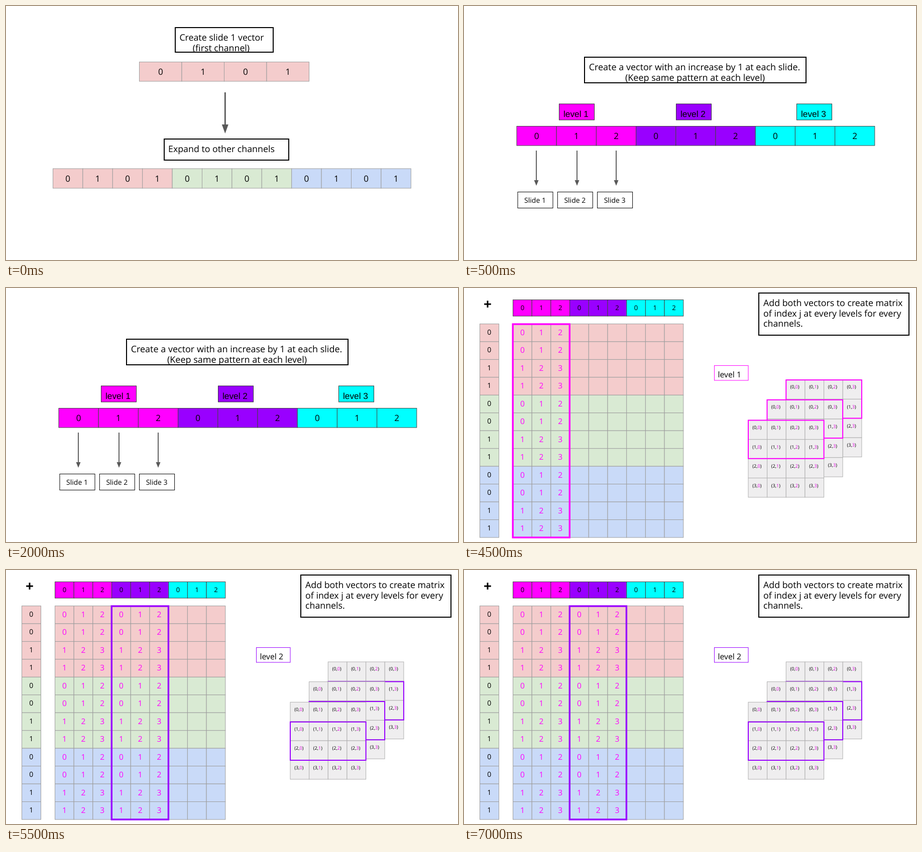
An HTML page that plays this animation: 900 px wide and 506 px high, repeating every 8 s.

```html
<!DOCTYPE html>
<html lang="en">
<head>
<meta charset="utf-8">
<title>Index matrix</title>
<style>
  html, body { margin: 0; width: 100%; height: 100%; overflow: hidden; background: #fff; }
  svg { display: block; width: 100%; height: 100%; }
  text { font-family: "Open Sans", "Noto Sans", sans-serif; text-rendering: geometricPrecision; }
  .arial { font-family: "Liberation Sans", Arial, sans-serif; }
</style>
</head>
<body>
<svg id="stage" viewBox="0 0 900 506"></svg>
<script>
const NS = "http://www.w3.org/2000/svg";
const stage = document.getElementById("stage");
const MAGENTA = "#ff00ff", PURPLE = "#9900ff", CYAN = "#00ffff";
const LEVELS = [MAGENTA, PURPLE, CYAN];
const CHANNELS = ["#f4cccc", "#d9ead3", "#c9daf8"];
const GRAY = "#9e9e9e", ARROW = "#595959";
const BODY = 17.8;
const LOOP = 8000;

function add(parent, tag, attrs) {
  const el = document.createElementNS(NS, tag);
  for (const key in attrs) el.setAttribute(key, attrs[key]);
  return parent.appendChild(el);
}

function rect(g, x, y, w, h, fill, stroke, width = 1) {
  return add(g, "rect", { x, y, width: w, height: h, fill, stroke, "stroke-width": width });
}

// y is the middle of the capital letters
function label(g, str, x, y, size, opts = {}) {
  const el = add(g, "text", {
    x, y: y + size * 0.357, "font-size": size, "text-anchor": "middle", fill: "#000", ...opts
  });
  el.textContent = str;
  return el;
}

const left = { "text-anchor": "start" };

function arrow(g, x, y1, y2, head, half, width) {
  add(g, "path", { d: `M${x} ${y1}V${y2 - head}`, stroke: ARROW, "stroke-width": width });
  add(g, "path", { d: `M${x - half} ${y2 - head}h${2 * half}L${x} ${y2}z`, fill: ARROW });
}

// A row of cells; value(i) and fill(i) give the content of each
function row(g, x, y, w, h, count, value, fill, stroke, size, dy = 0) {
  for (let i = 0; i < count; i++) {
    rect(g, x + i * w, y, w, h, fill(i), stroke);
    label(g, value(i), x + (i + 0.5) * w, y + h / 2 + dy, size);
  }
}

function channelScene(g) {
  rect(g, 337, 43, 195, 49, "#fff", "#000", 2);
  label(g, "Create slide 1 vector", 429.5, 63, BODY);
  label(g, "(first channel)", 428.5, 84, BODY);
  row(g, 265.5, 111.5, 84.5, 38.5, 4, i => i % 2, () => CHANNELS[0], GRAY, 17);
  arrow(g, 436.3, 172, 254, 18, 6.5, 2.8);
  rect(g, 315, 265, 248, 42, "#fff", "#000", 2);
  label(g, "Expand to other channels", 323, 285, BODY, left);
  row(g, 93.5, 324, 59.4, 39, 12, i => i % 2, i => CHANNELS[i >> 2], GRAY, 17);
}

function levelScene(g) {
  rect(g, 240, 102, 441, 51, "#fff", "#000", 2);
  label(g, "Create a vector with an increase by 1 at each slide.", 459, 122, 18);
  label(g, "(Keep same pattern at each level)", 460, 143, 18);
  [190, 423, 663].forEach((x, i) => {
    rect(g, x - 0.5, 195, 70, 32, LEVELS[i], "#333");
    label(g, "level " + (i + 1), x + 8, 214.5, 17.3, { ...left, class: "arial" });
  });
  row(g, 105, 239.5, 79.2, 38.5, 9, i => i % 3, i => LEVELS[i / 3 | 0], "#444", 17);
  [144, 225, 303].forEach((x, i) => {
    arrow(g, x, 288, 358, 11, 4.5, 1.9);
    const bx = 107 + i * 79.3;
    rect(g, bx, 370.5, 70, 32, "#fff", "#000");
    label(g, "Slide " + (i + 1), bx + 34.5, 387, 14);
  });
}

function pairs(g, x, y, level) {
  const w = 37.65, h = 38.4;
  for (let r = 0; r < 4; r++) {
    for (let c = 0; c < 4; c++) {
      const cx = x + c * w, cy = y + r * h;
      rect(g, cx, cy, w, h, "#efeeef", "#b0b0b0");
      const t = label(g, `(${r},`, cx + w / 2 - 1.5, cy + 14 + (r ? 1 : 0), 9.2);
      add(t, "tspan", { fill: "#e000e0" }).textContent = c;
      add(t, "tspan", {}).textContent = ")";
    }
  }
  rect(g, x, y + 0.2 + level * 39.2, 4 * w, 76.3, "none", LEVELS[level], 2);
}

function matrixScene(g, level) {
  const x = 97.5, y = 71.5, w = 37.7, h = 35.46;
  label(g, "+", 47, 32, 28, { "font-weight": 700 });
  row(g, x, 23.5, w, 32.5, 9, i => i % 3, i => LEVELS[i / 3 | 0], "#444", 13);
  for (let r = 0; r < 12; r++) {
    const top = y + r * h, fill = CHANNELS[r >> 2], base = (r >> 1) % 2;
    rect(g, 31.5, top, 38, h, fill, GRAY);
    label(g, base, 50.3, top + 16.5, 14);
    for (let c = 0; c < 9; c++) {
      rect(g, x + c * w, top, w, h, fill, GRAY);
      if (c < 3 * (level + 1)) {
        label(g, base + c % 3, x + (c + 0.5) * w, top + 17, 15.5, { fill: MAGENTA });
      }
    }
  }
  rect(g, x + level * 3 * w - 0.3, 72, 3 * w, 425, "none", LEVELS[level], 3.4);

  rect(g, 587, 10, 299, 84, "#fff", "#000", 2);
  ["Add both vectors to create matrix", "of index j at every levels for every", "channels."]
    .forEach((line, i) => label(g, line, 596, 29.5 + i * 20.7, BODY, left));

  rect(g, 498.5, 154.5, 67.5, 29.5, "#fff", LEVELS[level]);
  label(g, "level " + (level + 1), 505.5, 172, 15.8, left);
  pairs(g, 641.3, 183, level);
  pairs(g, 603.5, 222.6, level);
  pairs(g, 566, 263.3, level);
}

const scenes = [
  { start: 0, draw: channelScene },
  { start: 500, draw: levelScene },
  { start: 3000, draw: g => matrixScene(g, 0) },
  { start: 5500, draw: g => matrixScene(g, 1) }
];
for (const s of scenes) {
  s.group = add(stage, "g", {});
  s.draw(s.group);
}

const began = performance.now();
function tick() {
  const t = (performance.now() - began) % LOOP;
  const current = scenes.filter(s => s.start <= t).pop();
  for (const s of scenes) s.group.style.display = s === current ? "" : "none";
  requestAnimationFrame(tick);
}
tick();
</script>
</body>
</html>
```
